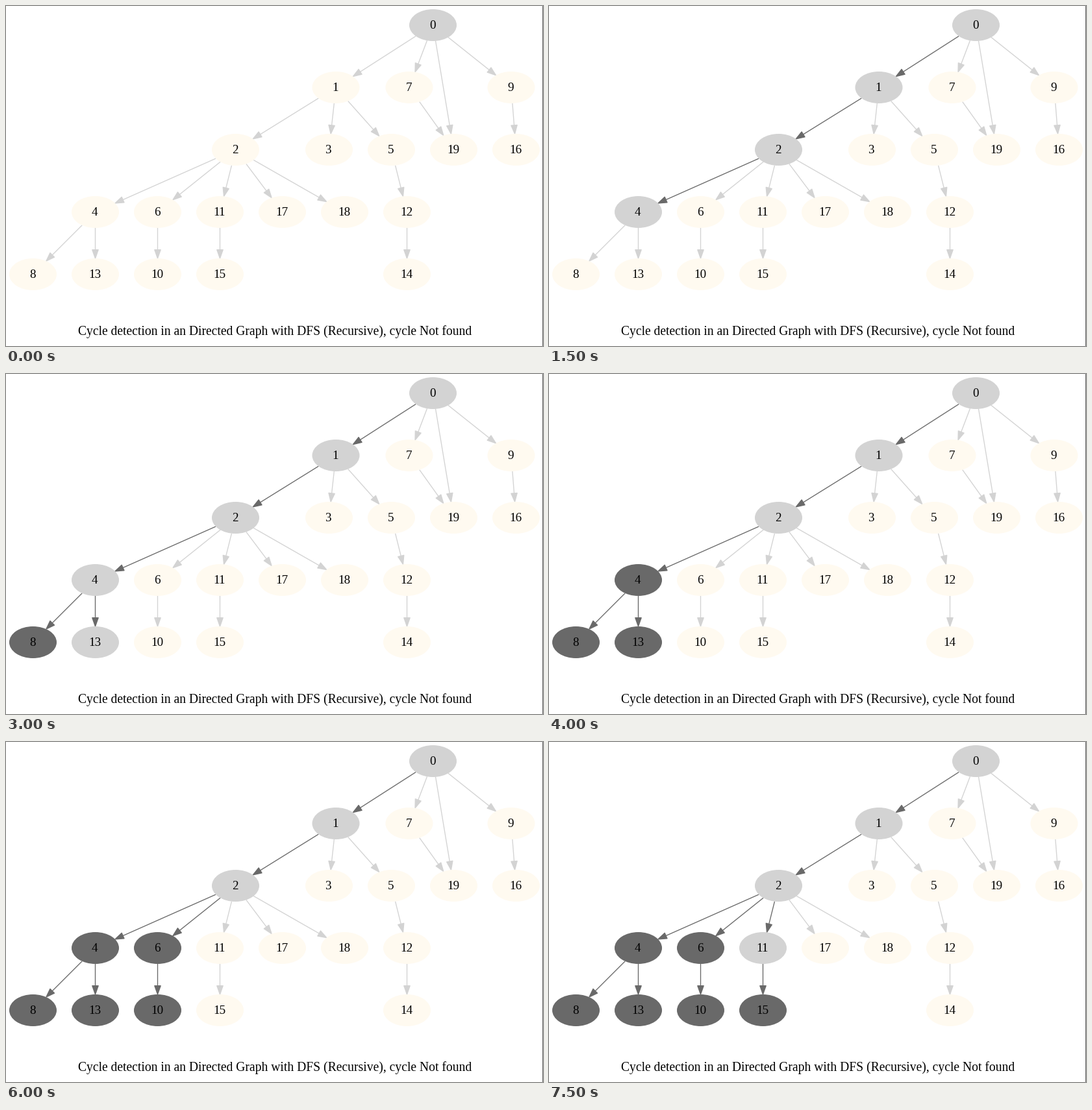
A matplotlib script for the animation above (8000 ms loop, 827 px wide and 524 px high).

```python
import math

import matplotlib.pyplot as plt
from matplotlib.animation import FuncAnimation
from matplotlib.patches import Ellipse, Polygon

# keep lines and ovals at their exact sub-pixel places
plt.rcParams["path.snap"] = False

W, H, DPI = 827, 524, 100
STEPS, STEP_MS = 16, 500
PITCH, TOP = 96, 29          # distance between columns and rows, first row
RX, RY = 36.5, 24.5          # node radii
PEN = 0.96

NEW, OPEN, DONE = "#fffaf0", "#d3d3d3", "#696969"
EDGE, EDGE_USED = "#d3d3d3", "#696969"
FONT = dict(family="Liberation Serif", color="black", ha="center", va="baseline")

CHILDREN = {
    0: [1, 7, 9, 19], 1: [2, 3, 5], 2: [4, 6, 11, 17, 18], 4: [8, 13],
    5: [12], 6: [10], 7: [19], 9: [16], 11: [15], 12: [14],
}

# per row: left x of each evenly spaced run of nodes
ROWS = [
    {657: [0]},
    {507.5: [1], 620.5: [7], 777.5: [9]},
    {353: [2], 497: [3, 5, 19, 16]},
    {137: [4, 6, 11, 17, 18, 12]},
    {41: [8, 13, 10, 15], 617: [14]},
]
POS = {n: (left + PITCH * i, TOP + PITCH * row)
       for row, runs in enumerate(ROWS)
       for left, run in runs.items()
       for i, n in enumerate(run)}


def dfs(node, parent=None, seen=None):
    """Yield (node, colour, edge walked) for each step of the search."""
    seen = set() if seen is None else seen
    seen.add(node)
    yield node, OPEN, (parent, node)
    for child in CHILDREN.get(node, []):
        if child not in seen:
            yield from dfs(child, node, seen)
    yield node, DONE, None


EVENTS = list(dfs(0))[:STEPS]

fig = plt.figure(figsize=(W / DPI, H / DPI), dpi=DPI, facecolor="white")
ax = fig.add_axes([0, 0, 1, 1])
ax.set_xlim(-0.5, W - 0.5)
ax.set_ylim(H - 0.5, -0.5)
ax.axis("off")


def add_edge(a, b, length=13.3, half=4.67):
    """Arrow along the line of centres, clipped at both ovals."""
    (xa, ya), (xb, yb) = POS[a], POS[b]
    dx, dy = xb - xa, yb - ya
    clip = 1 / math.hypot(dx / RX, dy / RY)
    d = math.hypot(dx, dy)
    ux, uy = dx / d, dy / d
    tx, ty = xb - dx * clip, yb - dy * clip
    bx, by = tx - ux * length, ty - uy * length
    line, = ax.plot([xa + dx * clip, bx], [ya + dy * clip, by], lw=PEN,
                    color=EDGE, solid_capstyle="butt", zorder=1)
    head = Polygon([(bx - uy * half, by + ux * half), (tx, ty),
                    (bx + uy * half, by - ux * half)],
                   closed=True, lw=PEN, color=EDGE, joinstyle="round", zorder=1)
    ax.add_patch(head)
    return line, head


def add_node(n):
    x, y = POS[n]
    oval = Ellipse((x, y), 2 * RX, 2 * RY, fc=NEW, lw=0, zorder=2)
    ax.add_patch(oval)
    ax.text(x - 0.8, y + 5.3, str(n), size=13.7, zorder=3, **FONT)
    return oval


edges = {(a, b): add_edge(a, b) for a, kids in CHILDREN.items() for b in kids}
nodes = {n: add_node(n) for n in POS}

ax.text(413.5, 507, "Cycle detection in an Directed Graph with DFS (Recursive), "
        "cycle Not found", size=14.15, **FONT)
ax.plot([W - 1, W - 1], [-1, H], color="#696969", lw=0.72)


def draw(step):
    for oval in nodes.values():
        oval.set_facecolor(NEW)
    for parts in edges.values():
        for part in parts:
            part.set_color(EDGE)
    for node, colour, edge in EVENTS[:step + 1]:
        nodes[node].set_facecolor(colour)
        for part in edges.get(edge, ()):
            part.set_color(EDGE_USED)
    return []


anim = FuncAnimation(fig, draw, frames=STEPS, interval=STEP_MS,
                     repeat=True, repeat_delay=0, blit=False)
plt.show()
```
